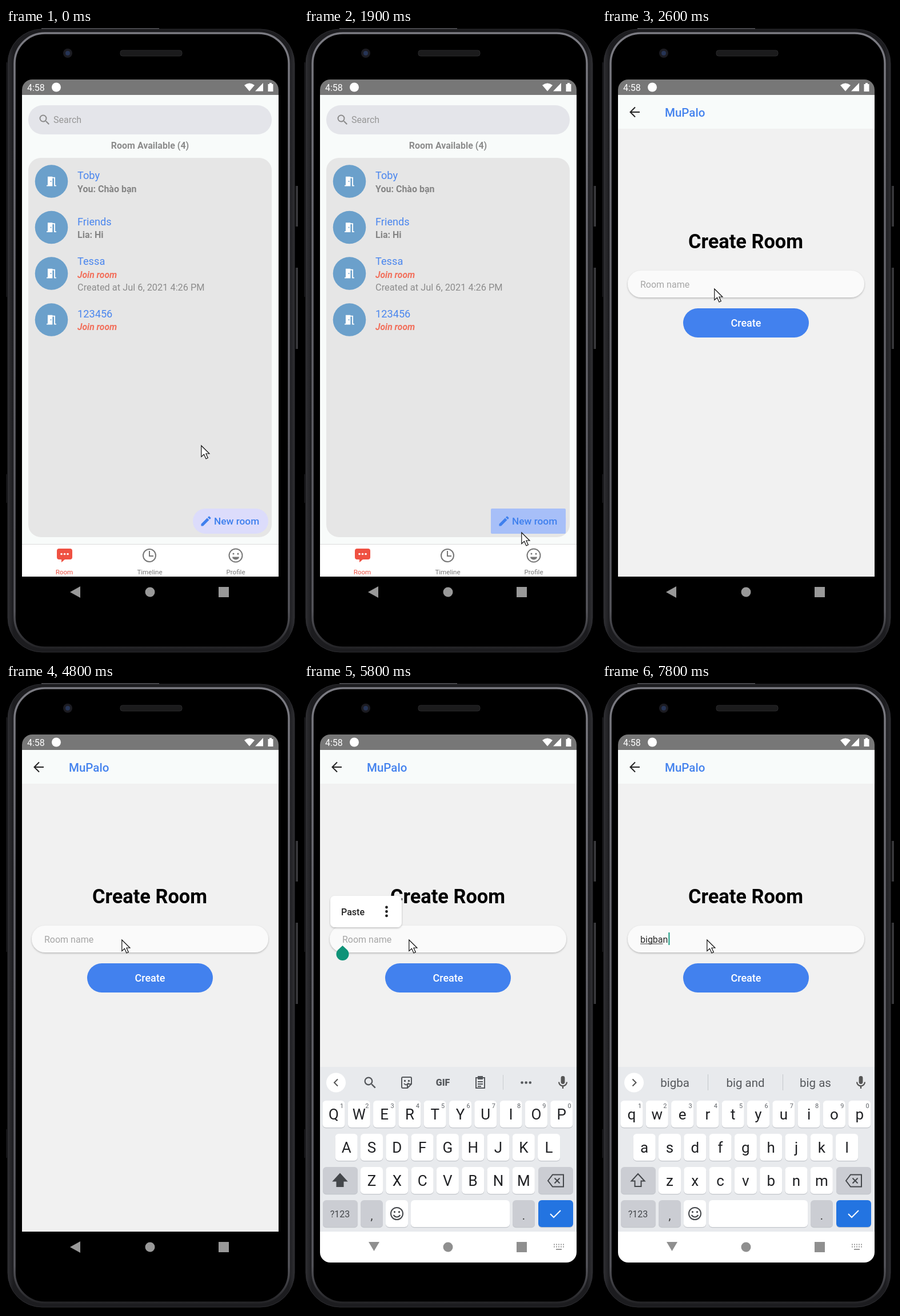
These frames come from a looping animation (511 px wide and 1096 px high, 8 s). An HTML page:

```html
<!DOCTYPE html>
<html lang="en">
<head>
<meta charset="utf-8">
<title>Create a room</title>
<style>
html, body { margin: 0; width: 100%; height: 100%; overflow: hidden; background: #000; }
svg { display: block; font: 16px Roboto, sans-serif; }
text { white-space: pre; }
.mid { text-anchor: middle; }
.bold { font-weight: 700; }
.semi { font-weight: 500; }
.name { font-size: 18.2px; fill: #4a86ee; }
.join { font: italic 700 15.7px Roboto, sans-serif; fill: #f2705c; }
.tab { font-size: 11.6px; fill: #777; text-anchor: middle; }
.key { font-size: 26px; fill: #202124; text-anchor: middle; }
.hint { font-size: 11px; fill: #5f6368; text-anchor: middle; }
.word { font-size: 20.5px; fill: #55585c; text-anchor: middle; }
.line { fill: none; stroke-width: 2; }
</style>
</head>
<body>
<svg width="511" height="1096" viewBox="0 0 511 1096">
  <defs>
    <clipPath id="screen"><path d="M28 959V108a18 18 0 0 1 18-18H459a18 18 0 0 1 18 18V959z"/></clipPath>
    <clipPath id="lower"><rect x="28" y="600" width="449" height="413" rx="18"/></clipPath>
    <filter id="soft" x="-10%" y="-30%" width="120%" height="170%">
      <feDropShadow dx="0" dy="1.5" stdDeviation="1.6" flood-opacity=".25"/>
    </filter>
    <linearGradient id="metal">
      <stop stop-color="#2f2f33"/><stop offset=".02" stop-color="#1c1c1f"/>
      <stop offset=".98" stop-color="#1c1c1f"/><stop offset="1" stop-color="#2f2f33"/>
    </linearGradient>
    <linearGradient id="shine" x2="0" y2="1">
      <stop stop-color="#7b7b82"/><stop offset=".3" stop-color="#66666d"/>
      <stop offset=".94" stop-color="#55555b"/><stop offset="1" stop-color="#242427"/>
    </linearGradient>
    <path id="lens" d="M15.5 14h-.79l-.28-.27A6.47 6.47 0 0 0 16 9.5 6.5 6.5 0 1 0 9.5 16c1.61 0 3.09-.59 4.23-1.57l.27.28v.79l5 4.99L20.49 19zM9.5 14a4.5 4.5 0 1 1 0-9 4.5 4.5 0 0 1 0 9z"/>
    <path id="door" fill="#fff" d="M14 6v15H3v-2h2V3h9v1h5v15h2v2h-4V6zm-4 5v2h2v-2z"/>
  </defs>

  <!-- phone body -->
  <rect width="511" height="1096"/>
  <path d="M507 276h4v71h-4zM507 419h4v142h-4z" fill="#353538"/>
  <path d="M0 60h2v410H0zM0 780h2v50H0z" fill="#141416"/>
  <path d="M62 0h206v2H62z" fill="#4a4a4e"/>
  <rect x="3" y="2" width="502" height="1089" rx="60" fill="url(#metal)" stroke="#2c2c30"/>
  <rect x="15" y="9" width="480" height="1074" rx="53" stroke="url(#shine)" stroke-width="3.5"/>
  <circle cx="108" cy="44" r="8" fill="#1c1c22"/><circle cx="108" cy="44" r="4" fill="#263455"/>
  <rect x="200" y="39" width="108" height="10" rx="4" fill="#1b1b1c" stroke="#29292b"/>
  <g fill="#999"><path d="M130 976v20l-18-10z"/><circle cx="252" cy="986" r="8.5"/><path d="M372 977h18v18h-18z"/></g>

  <g clip-path="url(#screen)">
    <!-- room list -->
    <path d="M28 117h449v842H28z" fill="#f8fbfa"/>
    <rect x="39" y="135" width="426" height="51" rx="25" fill="#e4e5ea"/>
    <use href="#lens" x="55.5" y="148.5" fill="#8b8b8b"/>
    <text x="83" y="166" fill="#979797">Search</text>
    <text x="252" y="211" class="mid bold" fill="#8c8c8c">Room Available (4)</text>
    <rect x="39" y="227" width="426" height="663" rx="22" fill="#e6e6e6"/>
    <g id="avatars" fill="#6ba0cb"></g>
    <text x="125" y="264" class="name">Toby</text>
    <text x="125" y="286.5" class="bold" fill="#858585">You: Chào bạn</text>
    <text x="125" y="345" class="name">Friends</text>
    <text x="125" y="367" class="bold" fill="#858585">Lia: Hi</text>
    <text x="125" y="414" class="name">Tessa</text>
    <text x="125" y="436.5" class="join">Join room</text>
    <text x="125" y="458.5" font-size="16.35" fill="#8c8c8c">Created at Jul 6, 2021 4:26 PM</text>
    <text x="125" y="506" class="name">123456</text>
    <text x="125" y="528" class="join">Join room</text>
    <rect x="327" y="840" width="132" height="44" rx="22" fill="#dcdcfb"/>
    <rect id="press" x="327" y="840" width="131" height="44" rx="2" fill="#a7bff8"/>
    <g fill="#3f80ee">
      <path transform="translate(338.6 850.6) scale(.95)" d="M3 17.25V21h3.75L17.81 9.94l-3.75-3.75zM20.71 7.04a1 1 0 0 0 0-1.41l-2.34-2.34a1 1 0 0 0-1.41 0l-1.83 1.83 3.75 3.75z"/>
      <text x="364" y="868" class="semi" font-size="17.3">New room</text>
    </g>
    <path d="M28 902h449v57H28z" fill="#fff"/><path d="M28 902h449v1H28z" fill="#dcdcdc"/>
    <path d="M93 910h19a4 4 0 0 1 4 4v11a4 4 0 0 1-4 4h-9l-6 5v-5h-4a4 4 0 0 1-4-4v-11a4 4 0 0 1 4-4z" fill="#ef5142"/>
    <path d="M97 919.5h.1m5.4 0h.1m5.4 0h.1" stroke="#fff" stroke-width="3.6" stroke-linecap="round"/>
    <g class="line" stroke="#777"><circle cx="251" cy="922" r="11"/><path d="M251 914v9h7"/><circle cx="402" cy="922" r="11.5"/></g>
    <path d="M396 924.5h12a6 5 0 0 1-12 0z" fill="#777"/>
    <path d="M398 919v.1m8 0v.1" stroke="#777" stroke-width="3" stroke-linecap="round"/>
    <text x="102" y="954.5" class="tab" style="fill:#ef5142">Room</text>
    <text x="251.5" y="954.5" class="tab">Timeline</text>
    <text x="402" y="954.5" class="tab">Profile</text>

    <!-- create page -->
    <g id="page">
      <path d="M28 117h449v842H28z" fill="#f1f1f1"/><path d="M28 117h449v59H28z" fill="#f8fbfa"/>
      <path d="M66 147H50m8-8.5l-8.5 8.5 8.5 8.5" class="line" stroke="#222"/>
      <text x="110" y="154.5" class="semi" font-size="20.5" fill="#4583ee">MuPalo</text>
      <text x="251.5" y="385" class="mid bold" font-size="34.4">Create Room</text>
      <rect x="45" y="424" width="414" height="47" rx="23.5" fill="#fafafa" filter="url(#soft)"/>
      <text id="empty" x="67" y="453.5" fill="#a6a6a6">Room name</text>
      <text id="typed" x="67" y="453.5" fill="#2a2a2a"></text>
      <rect id="under" x="67" y="455.5" height="1" fill="#333"/>
      <rect id="caret" y="436" width="2" height="22" fill="#159a80"/>
      <rect x="142" y="490" width="220" height="51" rx="25.5" fill="#4281ee"/>
      <text x="252" y="522" class="mid semi" font-size="18" fill="#fff">Create</text>
      <path id="handle" d="M67.5 459l7.8 7.2a11 11 0 1 1-15.6 0z" fill="#0f9378"/>
      <g id="popup">
        <rect x="46" y="372" width="125" height="55" rx="8" fill="#fff" filter="url(#soft)"/>
        <text x="65" y="405.5" class="semi" fill="#222">Paste</text>
        <path d="M144.5 392v.1m0 7.3v.1m0 7.3v.1" stroke="#222" stroke-width="4.8" stroke-linecap="round"/>
      </g>
    </g>

    <!-- status bar -->
    <path d="M28 90h449v27H28z" fill="#777"/>
    <g fill="#fff">
      <text x="37" y="109.5">4:58</text><circle cx="88" cy="103.5" r="8"/>
      <path d="M417 100q9-7 18 0l-9 10.5zM450 96v14.5h-14zM458.5 98h2.5v-2h4v2h2.5v13h-9z"/>
    </g>
  </g>

  <!-- keyboard -->
  <g clip-path="url(#lower)"><g id="board">
    <path d="M28 671h449v289H28z" fill="#e8eaed"/><path d="M28 959h449v55H28z" fill="#fff"/>
    <g fill="#8f8f8f"><path d="M113 977h19l-9.5 16z"/><circle cx="252" cy="986" r="8.5"/><path d="M372 977h18v18h-18z"/></g>
    <path d="M437 981.5h18m-18 4h18" stroke="#999" stroke-width="2" stroke-dasharray="2 2"/><path d="M441 990h10" stroke="#999" stroke-width="2"/>
    <circle cx="56" cy="698.5" r="17" fill="#fff"/>
    <path id="chevron" class="line" stroke="#555"/>
    <path transform="translate(439.2 684.8) scale(1.15)" d="M12 14a3 3 0 0 0 3-3V5a3 3 0 0 0-6 0v6a3 3 0 0 0 3 3zm5-3a5 5 0 0 1-10 0H5a7 7 0 0 0 6 6.92V21h2v-3.08A7 7 0 0 0 19 11z" fill="#555"/>
    <g id="tools" fill="#55585c">
      <use href="#lens" transform="translate(102 685) scale(1.15)"/>
      <g class="line" stroke="#55585c">
        <path d="M173 689h13a2 2 0 0 1 2 2v10l-7 7h-8a2 2 0 0 1-2-2v-15a2 2 0 0 1 2-2zm15 12h-7v7m-6-8q4 5 8-1"/>
        <path d="M301 690h15v18h-15zm3 7h9m-9 4h9m-9 4h6"/>
      </g>
      <path d="M175 694h3v3h-3zm7 0h3v3h-3zM304 687h9v6h-9z"/>
      <text x="243" y="704" class="mid" font-size="16" font-weight="900">GIF</text>
      <path d="M348 685h1v26h-1z" fill="#c9ccd1"/>
      <path d="M381.5 698.5h.1m7 0h.1m7 0h.1" stroke="#55585c" stroke-width="4.6" stroke-linecap="round"/>
    </g>
    <g id="words">
      <path d="M185 684h1v28h-1zM316 684h1v28h-1z" fill="#c4c7cc"/>
      <text x="127.5" y="706" class="word"></text><text x="251" y="706" class="word"></text><text x="373.5" y="706" class="word"></text>
    </g>
    <g id="keys"></g>
    <path id="shift" d="M63 858l11.5 12.5h-6v9.5h-11v-9.5h-6z" class="line" stroke="#44474b"/>
    <path d="M427 870l8-10.5h19v21h-19zm11.5-4.5l9 9m0-9l-9 9" class="line" stroke="#44474b"/>
    <text x="63" y="934" class="mid" fill="#44474b">?123</text>
    <text x="118.5" y="938" class="mid" font-size="20" fill="#333">,</text><text x="384.5" y="938" class="mid" font-size="20" fill="#333">.</text>
    <g class="line" stroke="#44474b"><circle cx="162.5" cy="927.5" r="10.5"/><path d="M156.5 930q6 7 12 0"/></g>
    <path d="M158.5 924.5v.1m8 0v.1" stroke="#44474b" stroke-width="3.2" stroke-linecap="round"/>
    <path d="M431 928l6 6 12-12" class="line" stroke="#fff"/>
  </g></g>

  <path id="mouse" d="M.8 1V20.5l4.7-4.3 3.5 7.8 3.3-1.5-3.4-7.5h6z" fill="#fff" stroke="#111" stroke-width="1.2"/>
</svg>
<script>
const $ = id => document.getElementById(id);
const show = (id, opacity) => $(id).setAttribute('opacity', +opacity);
const ramp = (t, a, b) => Math.min(1, Math.max(0, (t - a) / (b - a)));
const easeOut = p => 1 - (1 - p) ** 2;
const latest = (list, t) => list.filter(e => e[0] <= t).pop();

$('avatars').innerHTML = [268, 348.5, 429, 510].map(y =>
  `<circle cx="79.5" cy="${y}" r="28.8"/><use href="#door" transform="translate(68.3 ${y - 11}) scale(.93)"/>`).join('');

// Keys: a rounded plate with a thin shadow edge
const plate = (x, y, w, fill = '#fff') =>
  `<rect x="${x}" y="${y + 1.2}" width="${w}" height="47" rx="6" fill="#c3c6cb"/><rect x="${x}" y="${y}" width="${w}" height="47" rx="6" fill="${fill}"/>`;
const grey = '#cbcdd3';
const rows = [['qwertyuiop', 52, 730], ['asdfghjkl', 74.2, 788], ['zxcvbnm', 118.5, 846]];
$('keys').innerHTML = rows.map(([letters, x0, y], row) => [...letters].map((c, i) => {
  const x = x0 + i * 44.3;
  const hint = row ? '' : `<text x="${x + 14}" y="743" class="hint">${(i + 1) % 10}</text>`;
  return plate(x - 19.5, y, 39) + `<text x="${x}" y="${y + 33}" class="key">${c}</text>` + hint;
}).join('')).join('') +
  plate(33, 846, 61, grey) + plate(410, 846, 61, grey) + plate(33, 904, 61, grey) + plate(99, 904, 39, grey) +
  plate(143, 904, 39) + plate(187, 904, 173) + plate(365, 904, 39, grey) + plate(410, 904, 61, '#2374e1');
const letters = document.querySelectorAll('.key');
const words = document.querySelectorAll('.word');

const path = [[100, 341, 729], [700, 418, 844], [900, 418, 844], [1200, 426, 822], [1500, 374, 864], [1600, 374, 864],
  [1700, 380, 881], [2100, 380, 881], [2600, 196, 455], [3000, 202, 448], [4900, 202, 448], [5200, 183, 448]];
const typing = [[0, ''], [6000, 'b'], [6300, 'bi'], [6700, 'big'], [7000, 'bigb'], [7300, 'bigba'], [7700, 'bigban']];
const guesses = [[0, '', '', ''], [6100, 'b', 'but', 'best'], [6400, 'bi', 'big', 'bit'], [6800, 'big', 'bigger', 'bigg'],
  [7100, 'bigb', 'big by', 'big b'], [7300, 'bigba', 'big and', 'big as']];

function mouseAt(t) {
  const i = path.findIndex(p => p[0] > t);
  if (i < 0) return path[path.length - 1].slice(1);
  if (!i) return path[0].slice(1);
  const [a, b] = [path[i - 1], path[i]], p = ramp(t, a[0], b[0]);
  return [a[1] + (b[1] - a[1]) * p, a[2] + (b[2] - a[2]) * p];
}

function draw(t) {
  show('press', ramp(t, 1700, 1900) * (1 - ramp(t, 2000, 2300)));
  const open = easeOut(ramp(t, 2000, 2500)), s = .9 + .1 * open;
  show('page', open);
  $('page').setAttribute('transform', `translate(${252 * (1 - s)} ${538 * (1 - s)}) scale(${s})`);

  const rise = easeOut(ramp(t, 4900, 5300));
  show('board', rise > 0);
  $('board').setAttribute('transform', `translate(0 ${343 * (1 - rise)})`);

  const text = latest(typing, t)[1], typed = $('typed');
  typed.textContent = text;
  show('empty', !text);
  const width = n => n ? typed.getSubStringLength(0, n) : 0;
  $('under').setAttribute('width', width(Math.min(5, text.length)));
  $('caret').setAttribute('x', 67 + width(text.length) + (text ? 1 : -.5));
  show('caret', text || t >= 4900 && t < 5800 ? 1 : 0);
  const held = 1 - ramp(t, 5800, 6000);
  show('handle', t >= 5000 && held > 0);
  show('popup', ramp(t, 5200, 5400) * held);

  const lower = t >= 6100;
  letters.forEach(k => k.textContent = lower ? k.textContent.toLowerCase() : k.textContent.toUpperCase());
  $('shift').style.fill = lower ? 'none' : '#44474b';
  $('chevron').setAttribute('d', lower ? 'M53.5 692.5l6 6-6 6' : 'M59 692.5l-6 6 6 6');
  show('tools', !lower);
  show('words', lower);
  const guess = latest(guesses, t);
  words.forEach((w, i) => w.textContent = guess[i + 1]);

  $('mouse').setAttribute('transform', `translate(${mouseAt(t).map(Math.round)})`);
}

const start = performance.now();
function tick() {
  draw(Math.floor((performance.now() - start) % 8000 / 100) * 100);
  requestAnimationFrame(tick);
}
tick();
</script>
</body>
</html>
```
